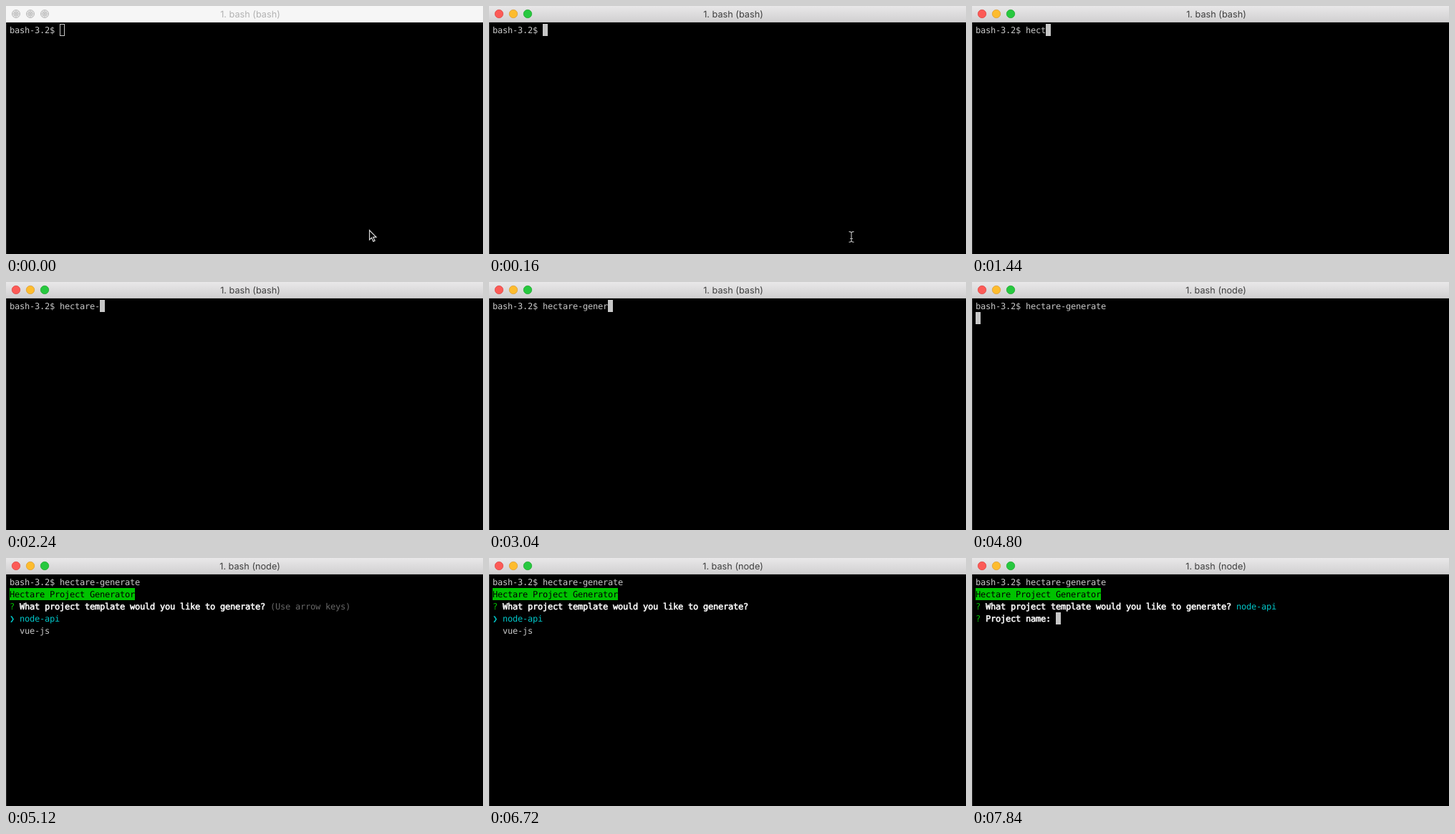
Write an HTML page that moves like this. It is 666 px wide and 347 px high and loops after 8 s.

```html
<!DOCTYPE html>
<html lang="en">
<head>
<meta charset="utf-8">
<title>Terminal</title>
<style>
  html, body { margin: 0; width: 100%; height: 100%; overflow: hidden; background: #000; }
  svg { display: block; width: 666px; height: 347px; }
  text { white-space: pre; text-rendering: geometricPrecision; }
  .term text { font: 12px "DejaVu Sans Mono", monospace; letter-spacing: -.2245px; fill: #c7c7c7; }
  .title { font: 12.7px Inter, sans-serif; text-anchor: middle; fill: #3f3f3f; }
  .term .green { fill: #00c200; }
  .term .cyan { fill: #00c5c7; }
  .term .dim { fill: #676767; }
  .term .black { fill: #000; }
  .term .bold { fill: #fff; stroke: #fff; stroke-width: .55px; }
</style>
</head>
<body>
<svg viewBox="0 0 666 347">
  <defs>
    <linearGradient id="bar" x2="0" y2="1">
      <stop stop-color="#e9e8e9"/>
      <stop offset="1" stop-color="#d0cfd0"/>
    </linearGradient>
    <g id="idle" fill="none" stroke="#bcbcbc">
      <circle r="5.5" fill="#e4e4e4"/>
      <circle r="2.8" stroke-width=".7"/>
      <path d="M-5 0H5M0-5V5M-3.7-3.7 3.7 3.7M-3.7 3.7 3.7-3.7" stroke-width=".7"/>
    </g>
  </defs>

  <rect width="666" height="347"/>
  <rect y="23" width="1" height="324" fill="#2b2b2b"/>

  <!-- Window in the background -->
  <g data-on="0 160">
    <rect width="666" height="23" fill="#f6f6f6"/>
    <use href="#idle" x="14" y="11"/>
    <use href="#idle" x="34" y="11"/>
    <use href="#idle" x="54" y="11"/>
    <text class="title" x="341" y="16" style="fill:#b2b2b2">1. bash (bash)</text>
    <path d="M507.5 313.8V327l3-2.8 2.3 5.2 2.2-1-2.3-5h4.2z" stroke="#d8d8d8" stroke-width="1.2"/>
  </g>

  <!-- Window in focus -->
  <g data-on="160 8000">
    <rect width="666" height="23" fill="url(#bar)"/>
    <rect y="22" width="666" height="1" fill="#bdbcbd"/>
    <g stroke-width=".8">
      <circle cx="14" cy="11" r="5.7" fill="#fc5b57" stroke="#df4744"/>
      <circle cx="34" cy="11" r="5.7" fill="#fdbc2e" stroke="#de9f34"/>
      <circle cx="54" cy="11" r="5.7" fill="#27c83f" stroke="#1faa2e"/>
    </g>
    <text class="title" data-on="160 4800" x="341" y="16">1. bash (bash)</text>
    <text class="title" data-on="4800 8000" x="340.5" y="16">1. bash (node)</text>
  </g>
  <path data-on="160 320" fill="none" stroke="#b4b4b4" stroke-width="1.2"
    d="M502.5 315.6q3.5 0 3.5 2.4 0-2.4 3.5-2.4M506 318v10M502.5 330.4q3.5 0 3.5-2.4 0 2.4 3.5 2.4M504 325.5h4"/>

  <g class="term">
    <rect id="cursor" width="7" height="17" fill="#c7c7c7"/>
    <rect data-on="0 160" x="75.5" y="25.5" width="6" height="16" fill="none" stroke="#c7c7c7"/>
    <text x="5" y="38">bash-3.2$ <tspan id="command"></tspan></text>

    <g data-on="4960 8000">
      <rect x="5" y="42" width="175" height="17" fill="#00c200"/>
      <text class="black" x="5" y="55">Hectare Project Generator</text>
    </g>
    <g data-on="5120 8000">
      <text x="5" y="72"><tspan class="green">?</tspan> <tspan class="bold">What project template would you like to generate?</tspan></text>
      <text class="dim" data-on="5120 5760" x="369" y="72">(Use arrow keys)</text>
      <text class="cyan" data-on="7840 8000" x="369" y="72">node-api</text>
    </g>
    <g data-on="5120 7840">
      <text class="cyan" id="pointer" x="5">❯</text>
      <text id="first" x="19" y="89">node-api</text>
      <text id="second" x="19" y="106">vue-js</text>
    </g>
    <text data-on="7840 8000" x="5" y="89"><tspan class="green">?</tspan> <tspan class="bold">Project name:</tspan></text>
  </g>
</svg>
<script>
  const LOOP = 8000, CELL = 7, LINE = 17;
  const COMMAND = "hectare-generate";
  // One key press per entry; two keys land together at 2720.
  const KEYS = [960, 1120, 1280, 1440, 1760, 1920, 2080, 2240, 2400, 2560,
                2720, 2720, 3040, 3200, 3520, 3680];

  const byId = id => document.getElementById(id);
  const cursor = byId("cursor"), command = byId("command"), pointer = byId("pointer");
  const options = [byId("first"), byId("second")];
  const timed = [...document.querySelectorAll("[data-on]")].map(el => {
    const [from, to] = el.dataset.on.split(" ").map(Number);
    return { el, from, to };
  });

  const show = (el, on) => { el.style.display = on ? "" : "none"; };

  function cursorCell(t, typed) {
    if (t < 160) return null;
    if (t < 3840) return [10 + typed, 0];
    if (t < 4960) return [0, 1];
    if (t < 5120) return [0, 2];
    return t < 7840 ? null : [16, 3];
  }

  function draw(t) {
    for (const { el, from, to } of timed) show(el, t >= from && t < to);

    const typed = KEYS.filter(key => key <= t).length;
    command.textContent = COMMAND.slice(0, typed);

    const cell = cursorCell(t, typed);
    show(cursor, cell);
    if (cell) {
      cursor.setAttribute("x", 5 + cell[0] * CELL);
      cursor.setAttribute("y", 25 + cell[1] * LINE);
    }

    const selected = t >= 5760 && t < 6720 ? 1 : 0;
    pointer.setAttribute("y", 89 + selected * LINE);
    options.forEach((el, i) => el.classList.toggle("cyan", i === selected));
  }

  const start = performance.now();
  function tick() {
    draw((performance.now() - start) % LOOP);
    requestAnimationFrame(tick);
  }
  tick();
</script>
</body>
</html>
```
